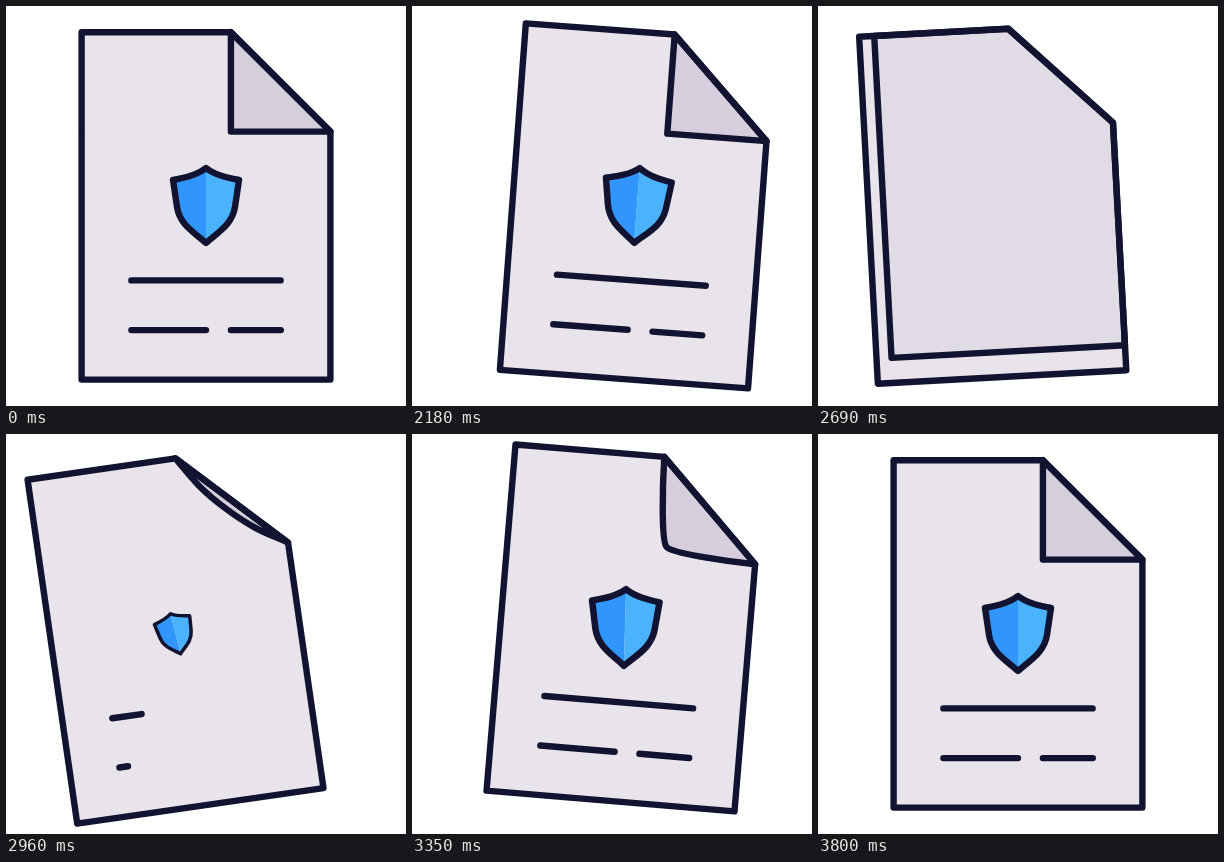
An HTML page for the animation above (3830 ms loop, 400 by 400 pixels).

```html
<!DOCTYPE html>
<html lang="en">
<head>
<meta charset="utf-8">
<title>Protected document</title>
<style>
  html, body { margin: 0; width: 100%; height: 100%; overflow: hidden; background: #fff; }
  svg { display: block; width: 100vw; height: 100vh; }
  .ink { stroke: #121331; stroke-width: 6.4; stroke-linecap: round; stroke-linejoin: round; }
</style>
</head>
<body>
<svg viewBox="0 0 400 400">
  <g id="sheet">
    <path fill="#e9e4ec" d="M75.6 26.2H224.9L324.4 125.6V373.6H75.6Z"/>
    <path id="lines" class="ink" fill="none"/>
    <g id="shield">
      <path fill="#3196fc" d="M200 162C191 169 179 171.5 167 174L171 201C174 219 188 226 200 237Z"/>
      <path fill="#4bb3fd" d="M200 162C209 169 221 171.5 233 174L229 201C226 219 212 226 200 237Z"/>
      <path class="ink" fill="none" d="M200 162C191 169 179 171.5 167 174L171 201C174 219 188 226 200 237C212 226 226 219 229 201L233 174C221 171.5 209 169 200 162Z"/>
    </g>
    <path id="fold" class="ink"/>
    <path class="ink" fill="none" d="M75.6 26.2H224.9L324.4 125.6V373.6H75.6Z"/>
  </g>
</svg>
<script>
const LOOP = 3830, HOLD = 2000, STEP = 30;
const COVERED = 26; // step at which the fold hides the whole sheet

// Keys are [step, value] pairs
const sway = [[0, 0], [13, 56.3], [26, -38], [27.3, -38], [47, 14.5], [58.5, 0]];
const bob = [[11.5, 0], [19, -6], [26, 0], [38, 0], [47.5, -7.2], [59.5, 0]];
const tilt = [[0, 0], [12.5, 9.1], [29.5, -9], [47, 5.3], [58.5, 0]];
const cover = [[13.2, 0], [25.4, 1]];
const fade = [[18, 0], [27, 1]];
const shieldScale = [[26, 0], [38, 1.1], [51, 0.96], [59, 1]];
const shieldTilt = [[26, 0], [38, -12], [51, 4], [59, 0]];
const topLine = [[28, 0], [42, 1]];
const bottomLine = [[29.5, 0], [45, 1]];

const el = id => document.getElementById(id);
const sheet = el('sheet'), lines = el('lines'), shield = el('shield'), fold = el('fold');
const clamp = x => Math.min(1, Math.max(0, x));
const smooth = x => x * x * (3 - 2 * x);
const lerp = (a, b, p) => a + (b - a) * p;

function track(keys, k) {
  if (k <= keys[0][0]) return keys[0][1];
  for (let i = 1; i < keys.length; i++) {
    const [t0, v0] = keys[i - 1], [t1, v1] = keys[i];
    if (k < t1) return lerp(v0, v1, smooth((k - t0) / (t1 - t0)));
  }
  return keys[keys.length - 1][1];
}

function mix(a, b, p) {
  return `rgb(${a.map((v, i) => Math.round(lerp(v, b[i], p)))})`;
}

function dash(x, y, length) {
  return length > 0 ? `M${x} ${y}h${length}` : '';
}

// The corner rises from the diagonal; its rounding shrinks to a sharp point
function curl(p) {
  const rest = 1 - p;
  const x = 224.9 + 49.7 * rest, y = 125.6 - 49.7 * rest;
  const round = 30 * rest;
  const bend = 16 * rest * rest, reach = 33 - 17 * rest;
  return `M224.9 26.2C${224.9 + bend} ${26.2 + reach} ${x - round} ${y - round} ${x} ${y}` +
    `C${x + round} ${y + round} ${324.4 - reach} ${125.6 - bend} 324.4 125.6Z`;
}

function drawFold(k) {
  if (k < COVERED) {
    const p = track(cover, k);
    const x = lerp(224.9, 75.6, p), y = lerp(125.6, 373.6, p);
    fold.setAttribute('d', `M224.9 26.2H${x}V${y}H324.4V125.6Z`);
    fold.setAttribute('fill', mix([214, 206, 221], [233, 228, 236], track(fade, k)));
  } else {
    fold.setAttribute('d', curl(1 - (1 - clamp((k - 30) / 27)) ** 2));
    fold.setAttribute('fill', '#d6cedd');
  }
}

function draw(time) {
  const k = Math.max(0, Math.floor((time % LOOP - HOLD) / STEP));
  const fresh = k >= COVERED;
  sheet.setAttribute('transform',
    `translate(${track(sway, k)} ${track(bob, k)}) rotate(${track(tilt, k)} 200 200)`);

  const scale = fresh ? track(shieldScale, k) : 1;
  const angle = fresh ? track(shieldTilt, k) : 0;
  shield.setAttribute('transform',
    `translate(200 200) rotate(${angle}) scale(${scale}) translate(-200 -200)`);
  shield.setAttribute('visibility', scale > 0 ? 'visible' : 'hidden');

  const top = fresh ? track(topLine, k) : 1;
  const bottom = 124.5 * (fresh ? track(bottomLine, k) : 1);
  lines.setAttribute('d',
    dash(125.4, 274.4, 149.2 * top) +
    dash(125.4, 324.1, Math.min(bottom, 74.6)) +
    dash(224.9, 324.1, bottom - 74.6));
  drawFold(k);
}

const start = performance.now();
function tick() {
  draw(performance.now() - start);
  requestAnimationFrame(tick);
}
tick();
</script>
</body>
</html>
```
